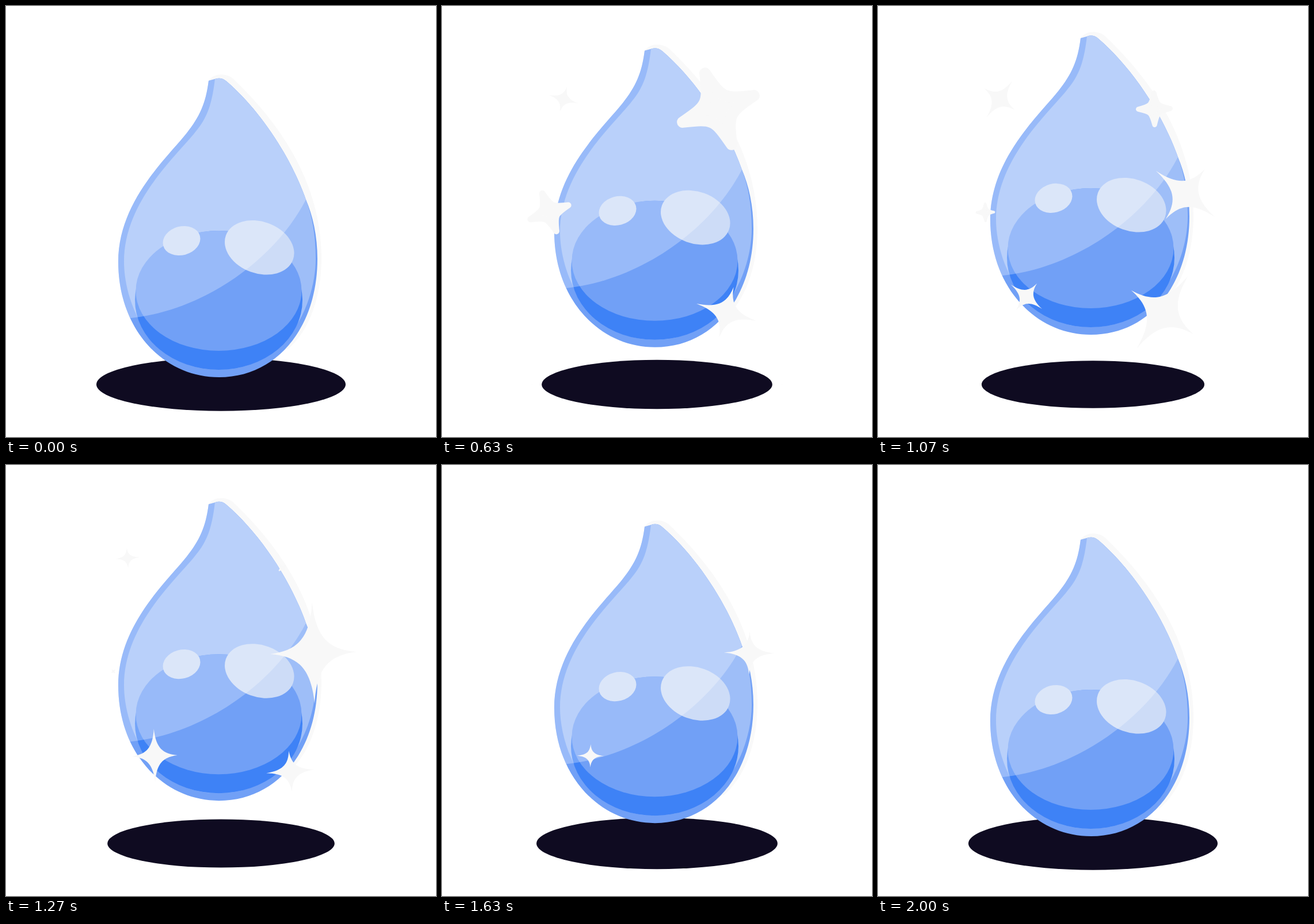
An HTML page for the animation above (2030 ms loop, 747 px wide and 750 px high).

```html
<!DOCTYPE html>
<html>
<head>
<meta charset="utf-8">
<style>
  html, body { margin: 0; width: 100%; height: 100%; overflow: hidden; background: #fff; }
  svg { display: block; }
</style>
</head>
<body>
<svg width="747" height="750" viewBox="0 0 747 750">
  <defs>
    <path id="body" d="M352 130C347 170 336 193 314 221C280 264 195 340 195 445C195 565 275 646 370 646
      C470 646 541 560 541 440C541 400 533 365 521 337C494 260 440 180 383 131Q374 123 363 127Z"/>
    <clipPath id="inBody"><use href="#body"/></clipPath>
    <path id="sharp" d="M0-1C.06-.3 .3-.06 .85 0C.3 .06 .06 .3 0 1C-.06 .3-.3 .06-.85 0C-.3-.06-.06-.3 0-1Z"/>
    <path id="soft" stroke="#f8f8f8" stroke-width=".26" stroke-linejoin="round"
      d="M0-.87C.17-.19 .19-.17 .87 0C.19 .17 .17 .19 0 .87C-.17 .19-.19 .17-.87 0C-.19-.17-.17-.19 0-.87Z"/>
  </defs>
  <ellipse id="shadow" cx="373.5" cy="658.5" fill="#0f0b21"/>
  <g id="drop">
    <path fill="#f9f9f9" d="M352 130C362 115 384 118 394 126C488 215 548 320 548 440C548 500 530 562 490 597L370 600Z"/>
    <use href="#body" fill="#71a0f6"/>
    <path fill="#9ebef8" d="M363 127C357 178 347 198 326 223C288 268 205 345 205 445C205 515 250 633 369 633
      C490 633 538 515 538 440C538 400 532 365 521 337C494 260 440 180 383 131Q374 123 363 127Z"/>
    <ellipse cx="369.5" cy="512" rx="145.5" ry="121" fill="#3e82f6"/>
    <ellipse cx="369.5" cy="495.5" rx="144" ry="104.5" fill="#71a0f6"/>
    <g fill="#cddcf7">
      <ellipse rx="33" ry="25" transform="translate(305 408.5) rotate(-15)"/>
      <ellipse rx="62" ry="45" transform="translate(440.3 420.3) rotate(20)"/>
    </g>
    <path clip-path="url(#inBody)" fill="#fff" fill-opacity=".275"
      d="M180 546L217 543C340 530 465 445 521 337L560 250V100H180Z"/>
  </g>
  <g id="stars" fill="#f8f8f8"></g>
</svg>
<script>
const FPS = 30, LOOP = 2030, SPIN = 8.4;
const $ = id => document.getElementById(id);

// Each pair shares a start, peak and end frame and a starting angle.
const star = (shape, x, y, size, [start, peak, end, angle]) => {
  const el = document.createElementNS('http://www.w3.org/2000/svg', 'use');
  el.setAttribute('href', '#' + shape);
  $('stars').append(el);
  return { el, x, y, size, start, peak, end, angle };
};
const first = [0, 20, 40, 0], second = [10, 27.5, 45, 30.4], third = [20, 37, 60, 27.3];
const stars = [
  star('soft', 480, 179, 80, first),
  star('soft', 186.5, 359, 42.5, first),
  star('sharp', 211, 162, 52, second),
  star('sharp', 494, 533, 105, second),
  star('sharp', 534, 327, 92, third),
  star('sharp', 258, 506, 49, third)
];

function draw(now) {
  const frame = Math.min(60, Math.floor((now % LOOP + 4) * FPS / 1000));
  const u = 1 - Math.abs(frame / 30 - 1);
  const lift = u * u * (3 - 2 * u);
  $('drop').setAttribute('transform', `translate(0 ${-75 * lift})`);
  const rx = 216.5 - 23.3 * lift;
  $('shadow').setAttribute('rx', rx);
  $('shadow').setAttribute('ry', rx * 0.2135);

  for (const s of stars) {
    const grow = Math.min((frame - s.start) / (s.peak - s.start), (s.end - frame) / (s.end - s.peak));
    s.el.style.display = grow > 0 ? '' : 'none';
    const turn = s.angle + SPIN * (frame - s.start);
    s.el.setAttribute('transform', `translate(${s.x} ${s.y}) rotate(${turn}) scale(${s.size * Math.max(grow, 0)})`);
  }
}

const began = performance.now();
function tick() {
  draw(performance.now() - began);
  requestAnimationFrame(tick);
}
tick();
</script>
</body>
</html>
```
